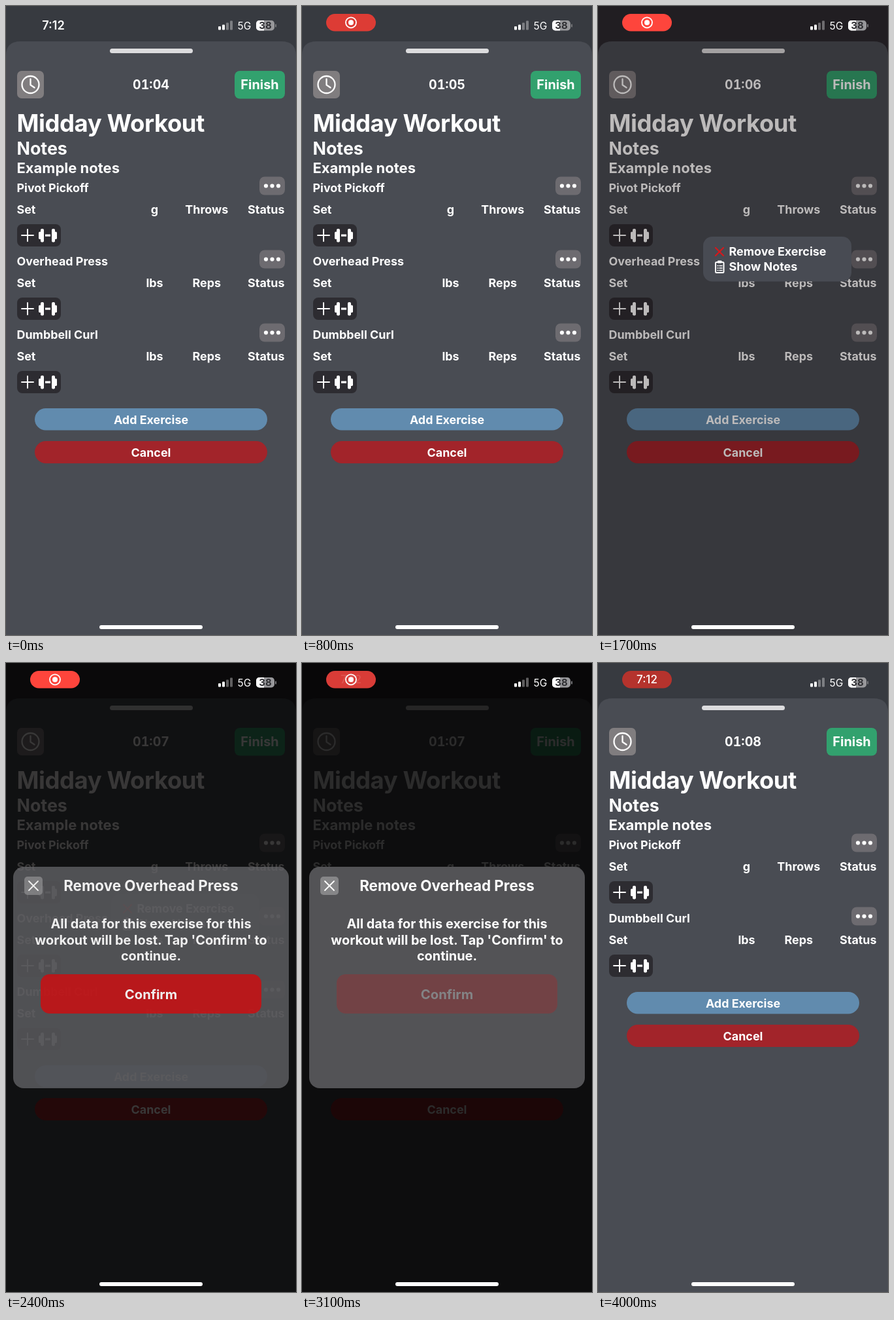
Write an HTML page that moves like this. It is 444x960 px and loops after 4.1 s.

```html
<!DOCTYPE html>
<html lang="en">
<head>
<meta charset="utf-8">
<title>Workout log</title>
<style>
  html, body { margin: 0; width: 100%; height: 100%; overflow: hidden; background: #000; }
  svg { display: block; width: 444px; height: 960px; }
  text { font: 650 17.9px Inter, "Liberation Sans", sans-serif; fill: #fff; }
  .mid { text-anchor: middle; }
  .end { text-anchor: end; }
  .line { fill: none; stroke: #fff; stroke-linecap: round; stroke-linejoin: round; }
  #timer text { font-size: 19.6px; font-feature-settings: "tnum"; }
  #message text { font-size: 19.9px; }
  #popover { transform-origin: 388px 386px; }
  #pill { transform-origin: 75px 25px; }
</style>
</head>
<body>
<svg viewBox="0 0 444 960">
  <defs>
    <g id="add">
      <rect x="17" y="333" width="67" height="34" rx="8" fill="#2d2c31"/>
      <path class="line" stroke-width="1.9" d="M24 350h18M33 341v18"/>
      <path fill="#fff" d="M60 348.5h8v3.2h-8z"/>
      <g fill="#fff">
        <rect x="53" y="340" width="5" height="20.5" rx="2"/>
        <rect x="70" y="340" width="5" height="20.5" rx="2"/>
        <rect x="50" y="344.5" width="4" height="11.5" rx="1.8"/>
        <rect x="74" y="344.5" width="4" height="11.5" rx="1.8"/>
      </g>
    </g>
    <g id="more">
      <rect x="388" y="260.5" width="39" height="28" rx="8" fill="#6d6b70"/>
      <g fill="#fff">
        <circle cx="398" cy="274.5" r="3.1"/>
        <circle cx="407.5" cy="274.5" r="3.1"/>
        <circle cx="417" cy="274.5" r="3.1"/>
      </g>
    </g>
  </defs>

  <rect id="back" width="444" height="960" fill="#373a40"/>

  <g id="sheet">
    <path fill="#494c53" d="M0 960V76Q0 54 22 54H422Q444 54 444 76V960Z"/>
    <rect x="159" y="65" width="127" height="7" rx="3.5" fill="#dcdcde"/>
    <rect x="17" y="99" width="41" height="42" rx="7" fill="#807d7f"/>
    <circle class="line" cx="37.5" cy="120" r="13" stroke-width="2.3"/>
    <path class="line" stroke-width="2.3" d="M37.5 111.5v9l6 4"/>
    <g id="timer"></g>
    <rect x="350" y="99" width="77" height="42.5" rx="8" fill="#32a16e"/>
    <text class="mid" x="388.5" y="127.3" style="font-size:19.9px">Finish</text>
    <text x="16.5" y="192" style="font-size:36.5px;font-weight:700;letter-spacing:-.45px">Midday Workout</text>
    <text x="16.5" y="227" style="font-size:26.8px;font-weight:700">Notes</text>
    <text x="16.5" y="255" style="font-size:22px">Example notes</text>
    <g id="rows"></g>
    <g id="actions">
      <rect x="44" y="614" width="356" height="33.5" rx="16.75" fill="#618bae"/>
      <text class="mid" x="222" y="637.5">Add Exercise</text>
      <rect x="44" y="664" width="356" height="34" rx="17" fill="#a2242a"/>
      <text class="mid" x="222" y="687.7">Cancel</text>
    </g>
  </g>

  <rect id="dim" width="444" height="960" fill="#0a0200"/>

  <g id="popover">
    <rect x="161" y="352" width="227" height="68.5" rx="14" fill="#484b53"/>
    <path class="line" style="stroke:#d3191d" stroke-width="2.3" d="M180 369l12 12M192 369l-12 12"/>
    <text x="200.5" y="381.3">Remove Exercise</text>
    <rect class="line" x="180" y="391" width="12.5" height="16" rx="1.5" stroke-width="2"/>
    <path class="line" stroke-width="1.4" d="M183 396.5h1M186 396.5h4M183 400h1M186 400h4M183 403.5h1M186 403.5h4"/>
    <rect x="183" y="388.5" width="6.5" height="4" rx="1" fill="#fff"/>
    <text x="200.5" y="404.3">Show Notes</text>
  </g>

  <rect id="shade" width="444" height="960"/>

  <g id="modal">
    <rect id="panel" x="11" y="311" width="422" height="338" rx="16" fill="#535356"/>
    <rect x="28" y="326" width="28" height="28" rx="5" fill="#868688"/>
    <path class="line" stroke-width="1.8" d="M35 333l14 14M49 333l-14 14"/>
    <text class="mid" x="222" y="348" style="font-size:22.4px">Remove Overhead Press</text>
    <g id="message"></g>
    <g id="confirm">
      <rect x="53" y="475" width="338" height="60" rx="14" fill="#c4191c"/>
      <text class="mid" x="222" y="512.8" style="font-size:20.2px;font-weight:700">Confirm</text>
    </g>
  </g>

  <g id="status">
    <text id="clock" class="mid" x="72.5" y="36.3" style="font-size:18.2px;font-weight:600">7:12</text>
    <g id="pill">
      <rect id="pillFill" x="37" y="12" width="76" height="26.5" rx="13.25" fill="#dd3c35"/>
      <g id="rec">
        <circle class="line" cx="75" cy="25.3" r="8" stroke-width="1.8"/>
        <circle cx="75" cy="25.3" r="4" fill="#fff"/>
      </g>
      <text id="pillTime" class="mid" x="75" y="31.4" style="font-size:17px;font-weight:500">7:12</text>
    </g>
    <g fill="#fff">
      <rect x="325" y="31" width="4" height="5.5" rx="1"/>
      <rect x="331" y="28.5" width="4" height="8" rx="1"/>
      <g opacity=".35">
        <rect x="337" y="25.5" width="4" height="11" rx="1"/>
        <rect x="343" y="22.5" width="4" height="14" rx="1"/>
      </g>
    </g>
    <text x="354.5" y="35.8" style="font-size:15.5px;font-weight:400">5G</text>
    <rect x="383" y="22" width="28" height="15.5" rx="4.8" fill="#98989b"/>
    <path fill="#fff" d="M395 22v15.5h-7.2a4.8 4.8 0 0 1-4.8-4.8v-5.9a4.8 4.8 0 0 1 4.8-4.8z"/>
    <rect x="412" y="27.5" width="2" height="5" rx="1" fill="#77777a"/>
    <text class="mid" x="397" y="35.2" style="font-size:15px;font-weight:700;fill:#303034">38</text>
  </g>
  <rect x="143" y="945" width="158" height="6" rx="3" fill="#fff"/>
</svg>

<script>
const LOOP = 4100;
const $ = id => document.getElementById(id);

const label = (x, y, text, cls = '') => `<text class="${cls}" x="${x}" y="${y}">${text}</text>`;

const exercises = [
  ['Pivot Pickoff', 'g', 'Throws'],
  ['Overhead Press', 'lbs', 'Reps'],
  ['Dumbbell Curl', 'lbs', 'Reps']
];

$('rows').innerHTML = exercises.map(([name, unit, count], i) => `
  <g id="row${i}"><g transform="translate(0 ${i * 112})">
    ${label(16.5, 283.6, name)}
    <use href="#more"/>
    ${label(16.5, 317.3, 'Set')}
    ${label(227.5, 317.3, unit, 'mid')}
    ${label(307.3, 317.3, count, 'mid')}
    ${label(426.5, 317.3, 'Status', 'end')}
    <use href="#add"/>
  </g></g>`).join('');

$('message').innerHTML = [
  'All data for this exercise for this',
  "workout will be lost. Tap 'Confirm' to",
  'continue.'
].map((line, i) => label(222, 405 + i * 24.5, line, 'mid')).join('');

const SECONDS = [4, 5, 6, 7, 8];
$('timer').innerHTML = SECONDS.map(s => label(222, 127.2, '01:0' + s, 'mid')).join('');

// steps: [time in ms, value]; the first and last values are held to the loop's ends
function track(el, prop, steps, easing = 'ease-in-out') {
  const all = [[0, steps[0][1]], ...steps, [LOOP, steps[steps.length - 1][1]]];
  el.animate(
    all.map(([t, v]) => ({ offset: t / LOOP, [prop]: v, easing })),
    { duration: LOOP, iterations: Infinity }
  );
}

const fade = (id, ...steps) => track($(id), 'opacity', steps);

[...$('timer').children].forEach((el, i) => {
  const from = i ? 150 + (i - 1) * 1000 : 0;
  const to = i < 4 ? 150 + i * 1000 : LOOP;
  track(el, 'opacity', [[0, i ? 0 : 1], [from, i ? 0 : 1], [from, 1], [to, 1], [to, i < 4 ? 0 : 1]], 'linear');
});

track($('back'), 'fill', [[1250, '#373a40'], [1600, '#2a292f'], [3150, '#2a292f'], [3550, '#373a40']]);
fade('dim', [1250, 0], [1600, .27], [3150, .27], [3550, 0]);
fade('shade', [1900, 0], [2400, .7], [2700, .77], [3150, .77], [3550, 0]);

fade('popover', [1250, 0], [1500, 1], [2300, 1], [2600, 0]);
track($('popover'), 'transform', [[1250, 'scale(.3)'], [1600, 'scale(1)']], 'ease-out');

fade('modal', [1950, 0], [2400, .94], [2550, 1], [3150, 1], [3500, 0]);
// the panel is see-through while it settles
fade('panel', [2400, .82], [2700, 1]);
track($('panel'), 'fill', [[2400, '#666669'], [2700, '#535356']]);
fade('confirm', [2900, 1], [3080, .28], [3150, .28], [3400, 1]);

fade('row1', [3250, 1], [3500, 0]);
for (const id of ['row2', 'actions'])
  track($(id), 'transform', [[3250, 'translateY(0px)'], [3590, 'translateY(-112px)']]);

fade('clock', [100, 1], [350, 0]);
fade('pill', [150, 0], [450, 1]);
track($('pill'), 'transform', [[150, 'scale(.7)'], [500, 'scale(1)']], 'ease-out');
track($('pillFill'), 'fill', [
  [1250, '#dd3c35'], [1600, '#fe453c'], [2800, '#fe453c'],
  [3100, '#d93c37'], [3600, '#b5332d']
]);
fade('rec', [3080, 1], [3400, 0]);
fade('pillTime', [3000, 0], [3400, 1]);
</script>
</body>
</html>
```
